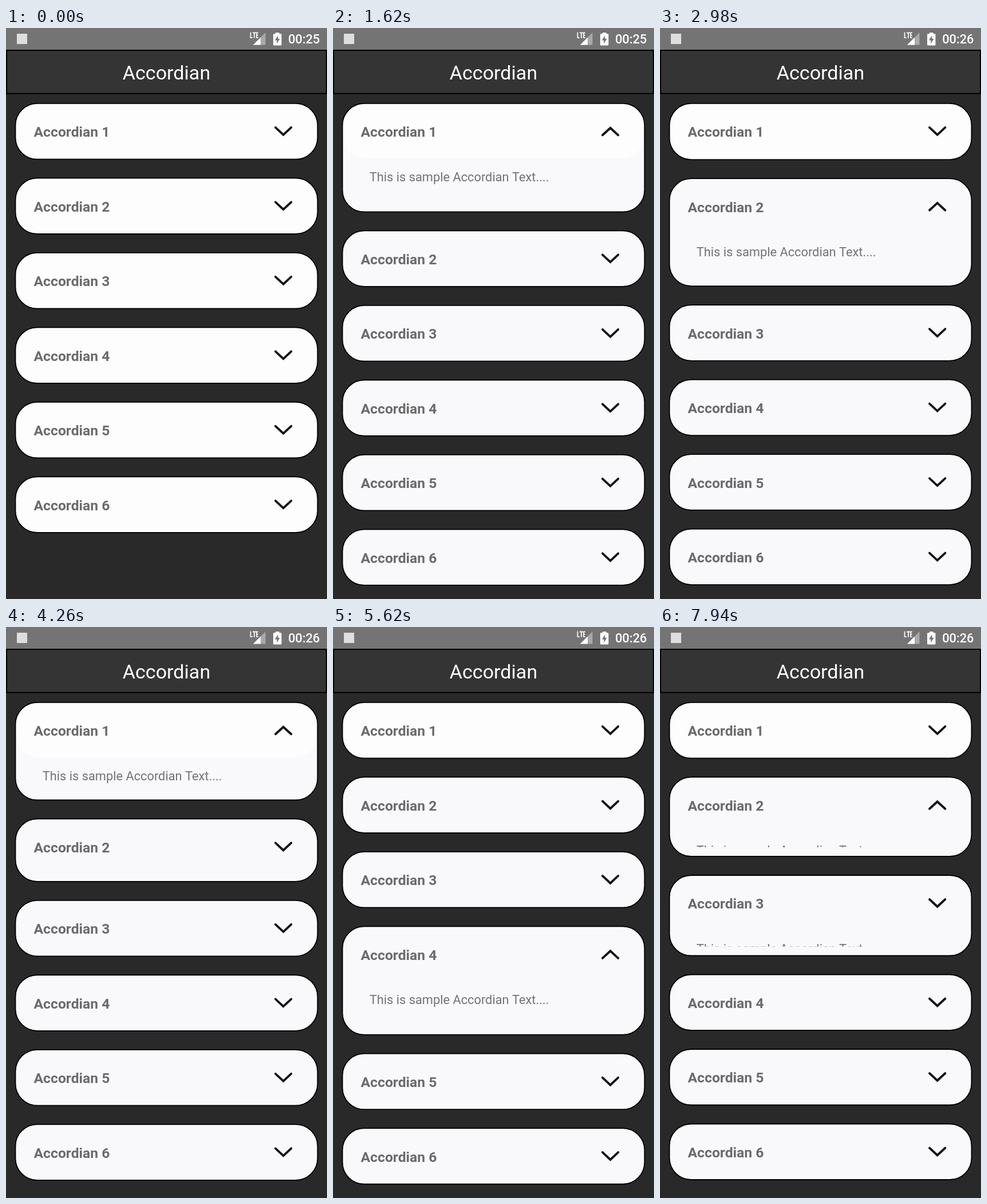
Recreate the animation shown at these times as an HTML page with a canvas. Size 561 by 998 pixels, loop 8000 ms.

```html
<!DOCTYPE html>
<html lang="en">
<head>
<meta charset="utf-8">
<title>Accordian</title>
<style>
  html, body { margin: 0; width: 100%; height: 100%; overflow: hidden; background: #292929; }
  canvas { display: block; }
</style>
</head>
<body>
<canvas id="stage" width="561" height="998"></canvas>
<script>
const ctx = document.getElementById('stage').getContext('2d');
const LOOP = 8000, TICK = 80, PHASE = 20;
const COUNT = 6, TOP = 131.9, HEAD = 97.5, GAP = 33, BODY = 92, RADIUS = 38;
const LEFT = 16.5, WIDTH = 528;
const FONT = 'Roboto, sans-serif';
const PALE = '#fdfdfd', TINT = '#f9f8fb';
const DURATION = 1000, CLOCK_CHANGE = 2600;

// Each tap closes one card and opens another, with slightly different delays.
const taps = [
  { at: 660, card: 0, prev: -1, open: 655, close: 655 },
  { at: 2260, card: 1, prev: 0, open: 2235, close: 2180, press: 2100, touch: [1940, 2260, 136, 403.5] },
  { at: 3860, card: 0, prev: 1, open: 3851, close: 3766, press: 3700, touch: [3540, 3860, 169, 188] },
  { at: 4740, card: 3, prev: 0, open: 4765, close: 4700 },
  { at: 6420, card: 2, prev: 3, open: 6485, close: 6386, press: 6260, touch: [6100, 6420, 211, 461.5] },
  { at: 7780, card: 1, prev: 2, open: 7761, close: 7716, press: 7460, touch: [7380, 7620, 171, 307] }
];

function easeOut(ms) {
  const u = Math.min(1, Math.max(0, ms / DURATION));
  return 1 - (1 - u) ** 3;
}

function text(str, x, y, font, color, align = 'left') {
  ctx.font = `${font} ${FONT}`;
  ctx.fillStyle = color;
  ctx.textAlign = align;
  ctx.fillText(str, x, y);
}

function shape(color, ...pts) {
  ctx.fillStyle = color;
  ctx.beginPath();
  for (let i = 0; i < pts.length; i += 2) ctx.lineTo(pts[i], pts[i + 1]);
  ctx.fill();
}

function rounded(x, y, w, h, r) {
  ctx.beginPath();
  ctx.roundRect(x, y, w, h, r);
}

function box(color, x, y, w, h) {
  ctx.fillStyle = color;
  ctx.fillRect(x, y, w, h);
}

function statusBar(t) {
  box('#747474', 0, 0, 561, 38);
  box('#dedede', 19, 10, 18, 18);

  // Network label and signal strength
  ctx.strokeStyle = '#fff';
  ctx.lineWidth = 1.7;
  ctx.stroke(new Path2D('M427.5 7.5V17H431M431 8.3H437M434 8.3V17.8M440.8 8.3H438.1V17H440.8M438.1 12.6H440.5'));
  shape('#a9a9a9', 432, 29.5, 453.5, 8, 453.5, 29.5);
  shape('#fff', 432, 29.5, 445, 16.5, 445, 29.5);

  // Charging battery
  box('#fff', 471, 8, 6.5, 4);
  ctx.fillStyle = '#fff';
  rounded(467, 10, 14.5, 20.5, 1.5);
  ctx.fill();
  shape('#747474', 475.3, 13, 470, 21.5, 473.4, 21.5, 473.4, 27.5, 478.6, 18.8, 475.3, 18.8);

  text(t < CLOCK_CHANGE ? '00:25' : '00:26', 548.5, 27.3, '500 21.8px', '#fff', 'right');
}

function titleBar() {
  box('#353434', 0, 38, 561, 77);
  ctx.strokeStyle = '#000';
  ctx.lineWidth = 2;
  ctx.strokeRect(1, 39, 559, 75.5);
  text('Accordian', 280.5, 90, '34.1px', '#fff', 'center');
}

function chevron(top, up) {
  const tip = top + (up ? 42.8 : 54.8), ends = top + (up ? 55.4 : 42);
  ctx.strokeStyle = '#151515';
  ctx.lineWidth = 3.9;
  ctx.lineCap = 'round';
  ctx.beginPath();
  ctx.moveTo(471, ends);
  ctx.lineTo(484.7, tip);
  ctx.lineTo(498.4, ends);
  ctx.stroke();
  ctx.lineCap = 'butt';
}

function card(i, top, extra, up, pressed, t) {
  const h = HEAD + extra;
  rounded(LEFT, top, WIDTH, h, RADIUS);
  ctx.fillStyle = t < taps[0].at ? PALE : TINT;
  ctx.fill();
  if (i === 0) {
    rounded(LEFT + 1, top, WIDTH - 2, HEAD - 2, RADIUS);
    ctx.fillStyle = PALE;
    ctx.fill();
  }
  rounded(LEFT, top, WIDTH, h, RADIUS);
  ctx.strokeStyle = '#000';
  ctx.lineWidth = 1.8;
  ctx.stroke();

  ctx.globalAlpha = pressed ? 0.85 : 1;
  text(`Accordian ${i + 1}`, 48.5, top + 58.5, 'bold 24.7px', '#6b6b6b');
  chevron(top, up);
  ctx.globalAlpha = 1;

  if (extra > 0) {
    ctx.save();
    ctx.beginPath();
    ctx.rect(LEFT, top + HEAD - 16, WIDTH, extra);
    ctx.clip();
    text('This is sample Accordian Text....', 63.8, top + 135.6, '21.8px', '#737373');
    ctx.restore();
  }
}

function touchDot(x, y) {
  const g = ctx.createRadialGradient(x, y, 0, x, y, 19);
  g.addColorStop(0, 'rgba(150,150,150,.16)');
  g.addColorStop(0.8, 'rgba(150,150,150,.2)');
  g.addColorStop(1, 'rgba(150,150,150,0)');
  ctx.fillStyle = g;
  ctx.beginPath();
  ctx.arc(x, y, 19, 0, Math.PI * 2);
  ctx.fill();
}

function draw(t) {
  const extra = Array(COUNT).fill(0);
  let active = -1, pressed = -1;
  for (const tap of taps) {
    if (t >= tap.at) {
      active = tap.card;
      extra[tap.card] = BODY * easeOut(t - tap.open);
      if (tap.prev >= 0) extra[tap.prev] = BODY * (1 - easeOut(t - tap.close));
    } else if (t >= tap.press) {
      pressed = tap.card;
    }
  }

  box('#292929', 0, 0, 561, 998);
  statusBar(t);
  titleBar();
  let top = TOP;
  extra.forEach((more, i) => {
    card(i, top, more, i === active, i === pressed, t);
    top += HEAD + more + GAP;
  });
  for (const { touch } of taps) {
    if (touch && t >= touch[0] && t < touch[1]) touchDot(touch[2], touch[3]);
  }
}

function frame() {
  const t = performance.now() % LOOP;
  draw(Math.floor((t - PHASE) / TICK) * TICK + PHASE);
  requestAnimationFrame(frame);
}
frame();
</script>
</body>
</html>
```
